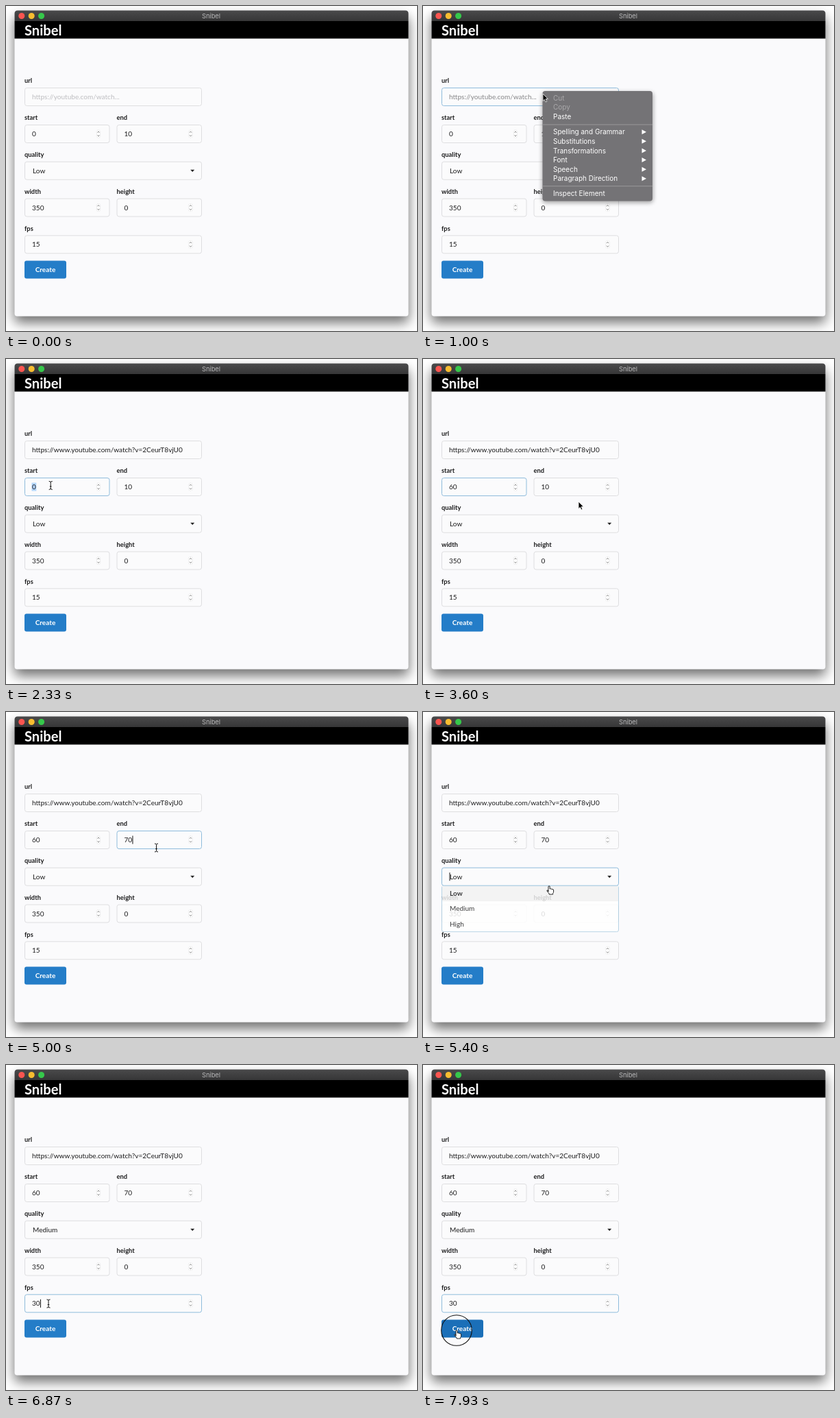
Write an HTML page that moves like this. It is 600 px wide and 474 px high and loops after 8000 ms.

```html
<!DOCTYPE html>
<html lang="en">
<head>
<meta charset="utf-8">
<title>Snibel</title>
<style>
html, body { margin: 0; width: 100%; height: 100%; overflow: hidden; background: #fff; }
svg { display: block; width: 600px; height: 474px; }
text { font: 10.05px Lato, sans-serif; fill: #1c1c1d; white-space: pre; }
.label { font-size: 9.35px; font-weight: 700; }
.menu text { font: 10px Inter, sans-serif; fill: #fff; }
.menu .off { fill: #a9a8aa; }
.box { fill: #fbfbfc; stroke: #dedee0; }
.spin { fill: none; stroke: #6d6d6d; stroke-width: .8; }
.ring { fill: none; stroke: #111; stroke-width: 1.1; }
</style>
</head>
<body>
<svg id="stage" viewBox="0 0 600 474">
  <defs>
    <filter id="blur" x="-10%" y="-10%" width="120%" height="120%"><feGaussianBlur stdDeviation="9"/></filter>
    <filter id="soft" x="-10%" y="-10%" width="120%" height="120%"><feGaussianBlur stdDeviation="3"/></filter>
    <linearGradient id="bar" x2="0" y2="1">
      <stop stop-color="#4a4a4b"/><stop offset="1" stop-color="#363637"/>
    </linearGradient>
  </defs>
  <rect width="600" height="474" fill="#fff"/>
  <rect x="12" y="16" width="576" height="446" rx="6" opacity=".56" filter="url(#blur)"/>
  <path d="M12.5 452.5V11q0-4.5 4.5-4.5H583q4.500 4.500 4.500V452.5Z" fill="none"/>
  <rect x="12.500" y="6.500" width="575" height="446" rx="4" fill="#fafafc"/>
  <path d="M12.500 22V11q0-4.500 4.500-4.500H583q4.500 0 4.500 4.500V22Z" fill="url(#bar)"/>
  <rect x="12.500" y="22" width="575" height="25.500" fill="#000"/>
  <circle cx="22.800" cy="14.500" r="4.500" fill="#fb5550"/>
  <circle cx="37.200" cy="14.500" r="4.500" fill="#f8bd30"/>
  <circle cx="51.600" cy="14.500" r="4.500" fill="#36c84b"/>
  <text x="299.500" y="18" text-anchor="middle" style="font:9.300px Inter,sans-serif;fill:#b9b9ba">Snibel</text>
  <text x="27" y="42.500" style="font-size:20.100px;font-weight:700;fill:#fff">Snibel</text>
  <g id="form"></g>
  <rect id="button" x="27" y="371.500" width="61" height="26" rx="3"/>
  <text x="57.500" y="388" text-anchor="middle" style="font-weight:700;fill:#fff">Create</text>
  <g id="list"></g>
  <g id="menu" class="menu"></g>
  <circle id="ring" class="ring" r="22.300"/>
  <g id="cursor">
    <path id="arrow" d="M0 0V10.500L2.400 8.300 4 12 5.800 11.200 4.200 7.600H7.400Z" fill="#000" stroke="#fff" stroke-width=".8"/>
    <path id="beam" d="M-2.500-6Q0-6 0-4.500V4.500Q0 6-2.500 6M2.500-6Q0-6 0-4.500M0 4.500Q0 6 2.500 6M-1.300 1.500H1.300" fill="none" stroke="#111"/>
    <path id="hand" d="M-1 8V1Q-1-.3.1-.3T1.200 1V4Q2.200 3.200 3.100 4.300 4 3.600 5 4.700 6.600 4.300 6.600 6V8Q6.600 9.500 5.600 10.500V12H.2V11L-3 7Q-3.400 5.600-2.200 5.900L-1 7Z" fill="#fff" stroke="#111" stroke-width=".9"/>
  </g>
</svg>
<script>
const LOOP = 8000, STEP = 1000 / 15;
const $ = id => document.getElementById(id);
const within = (t, ranges) => ranges.some(([a, b]) => t >= a && t < b);
const latest = (t, steps) => steps.filter(s => s[0] <= t).pop();
const clamp = v => Math.max(0, Math.min(1, v));
const show = (el, on) => el.setAttribute('visibility', on ? 'visible' : 'hidden');
const set = (el, attrs) => { for (const k in attrs) el.setAttribute(k, attrs[k]); };

const URL_TEXT = 'https://www.youtube.com/watch?v=2CeurT8vjU0';
const BLUE = '#8fbcdc';
const fields = [
  { name: 'url', x: 27, y: 119, w: 259, steps: [[0, 'https://youtube.com/watch...'], [1600, URL_TEXT]],
    focus: [600, 2130], caret: [[1600, 2100]], home: [[1460, 1600]] },
  { name: 'start', x: 27, y: 173, w: 124.500, spin: 1, steps: [[0, '0'], [3200, '6'], [3330, '60']],
    focus: [2130, 4000], pick: [2200, 3200] },
  { name: 'end', x: 161.500, y: 173, w: 124.500, spin: 1, steps: [[0, '10'], [4470, '7'], [4600, '70']],
    focus: [4000, 5230], pick: [4070, 4470], caret: [[4470, 5200]] },
  { name: 'quality', x: 27, y: 226.700, w: 259, steps: [[0, 'Low'], [5660, 'Medium']],
    focus: [5230, 6400], home: [[5260, 5600], [5800, 6200]] },
  { name: 'width', x: 27, y: 280.500, w: 124.500, spin: 1, steps: [[0, '350']] },
  { name: 'height', x: 161.500, y: 280.500, w: 124.500, spin: 1, steps: [[0, '0']] },
  { name: 'fps', x: 27, y: 334.300, w: 259, spin: 1, steps: [[0, '15'], [6730, '3'], [6860, '30']],
    focus: [6400, LOOP], pick: [6470, 6730], caret: [[6730, 7360]] }
];

// time, x, y, pointer shape until the next key
const path = [
  [270, 284, 222, 'arrow'], [470, 205, 145, 'beam'], [660, 175, 128, 'beam'],
  [930, 175, 128, 'arrow'], [1000, 175, 128, 'arrow'], [1200, 182, 160, 'arrow'],
  [1400, 180, 163, 'arrow'], [1530, 179, 167, 'arrow'], [1600, 168, 171, 'arrow'],
  [1730, 77, 177, 'beam'], [1870, 66, 178, 'beam'], [2070, 66, 178, 'beam'],
  [2400, 65, 186, 'beam'], [3470, 65, 186, 'beam'], [3600, 227, 208, 'arrow'],
  [3800, 223, 200, 'beam'], [4000, 219.500, 198, 'beam'], [5000, 219.500, 198, 'beam'],
  [5130, 200, 230, 'hand'], [5260, 190, 241, 'hand'], [5400, 184, 254, 'hand'],
  [5600, 178, 287, 'hand'], [5870, 178, 287, 'hand'], [6000, 150, 306, 'arrow'],
  [6200, 80, 342, 'beam'], [6400, 62, 348, 'beam'], [7100, 62, 348, 'beam'],
  [7400, 68, 374, 'hand'], [7600, 60, 382, 'hand'], [7800, 49, 387, 'hand']
];
const clicks = [[1230, 1340], [2130, 2270], [4000, 4140], [5230, 5340], [5600, 5730], [6400, 6540], [7860, LOOP]];

$('form').innerHTML = fields.map(f => {
  const cy = f.y + 13.500, right = f.x + f.w;
  const icon = f.spin
    ? `<g transform="translate(${right - 16.500} ${cy})"><rect x="-2.600" y="-5.500" width="5.200" height="11" rx="2" fill="#fff" stroke="#ccc" stroke-width=".6" stroke-dasharray="1 1"/>
       <path class="spin" d="M-1.500-1.800L0-3.600 1.500-1.800M-1.500 1.800L0 3.600 1.500 1.800"/></g>`
    : f.name === 'quality' ? `<path d="M269.200 238.800h6l-3 3.200z" fill="#222"/>` : '';
  return `<text class="label" x="${f.x}" y="${f.y - 6.700}">${f.name}</text>
    <rect class="box" x="${f.x + .5}" y="${f.y + .5}" width="${f.w - 1}" height="26" rx="3"/>
    <rect class="pick" x="${f.x + 10.500}" y="${cy - 6}" height="12" fill="#b3d6fd"/>
    <text class="value" x="${f.x + (f.name === 'quality' ? 12 : 11)}" y="${cy + 3.500}"></text>
    <path class="caret" stroke="#111"/>${icon}`;
}).join('');
for (const part of ['box', 'pick', 'value', 'caret'])
  document.querySelectorAll('#form .' + part).forEach((el, i) => fields[i][part + 'El'] = el);

$('list').innerHTML = `<rect x="27.500" y="253.500" width="258" height="79" rx="3" fill="#fff" stroke="#a5c9df"/>
  <rect id="hover" x="28" width="257" height="26" fill="#f2f2f2"/>` +
  ['Low', 'Medium', 'High'].map((s, i) =>
    `<text x="39" y="${270.500 + i * 26.500}"${i ? '' : ' font-weight="700" style="font-weight:700"'}>${s}</text>`).join('');

const items = [['Cut', 137.500], ['Copy', 151], ['Paste', 164.700], ['Spelling and Grammar', 187.200], ['Substitutions', 200.800],
  ['Transformations', 214.500], ['Font', 228], ['Speech', 241.700], ['Paragraph Direction', 255.300], ['Inspect Element', 277.300]];
$('menu').innerHTML = `<rect x="174" y="126" width="162" height="161" rx="5" opacity=".35" filter="url(#soft)"/>
  <rect x="174.500" y="124" width="160.500" height="160.500" rx="4" fill="#747376"/>
  <rect id="paste" x="174.500" y="154.500" width="160.500" height="13.500" fill="#2a72e8"/>
  <path d="M175 173H335M175 262.700H335" stroke="#99989a"/>` +
  items.map(([s, y], i) => `<text x="190" y="${y}"${i < 2 ? ' class="off"' : ''}>${s}</text>` +
    (i > 2 && i < 9 ? `<path d="M319.500 ${y - 7}l6.500 3.500-6.500 3.500z" fill="#fff"/>` : '')).join('');

function drawField(f, t) {
  const focused = f.focus && within(t, [f.focus]);
  const hint = f.name === 'url' && t < 1600;
  f.valueEl.textContent = latest(t, f.steps)[1];
  f.valueEl.style.fill = hint ? (focused ? '#858587' : '#bdbdc0') : '';
  f.boxEl.style.stroke = !focused ? '' : f.name === 'quality' && t > 5730 ? '#a3a3a5' : BLUE;
  const picked = !!f.pick && within(t, [f.pick]);
  const width = f.valueEl.getComputedTextLength();
  show(f.pickEl, picked);
  f.pickEl.setAttribute('width', width + 1);
  const atHome = within(t, f.home || []);
  const left = +f.valueEl.getAttribute('x') + (atHome ? 0 : width + .8);
  f.caretEl.setAttribute('d', `M${left} ${f.y + 7.500}v12`);
  show(f.caretEl, atHome || within(t, f.caret || []));
}

function drawCursor(t) {
  const i = path.findLastIndex(k => k[0] <= t);
  show($('cursor'), i >= 0);
  show($('ring'), within(t, clicks));
  if (i < 0) {
    for (const id of ['arrow', 'beam', 'hand']) show($(id), false);
    return [0, 0];
  }
  const a = path[i], b = path[i + 1] || a;
  const p = b === a ? 0 : (t - a[0]) / (b[0] - a[0]);
  const x = a[1] + (b[1] - a[1]) * p, y = a[2] + (b[2] - a[2]) * p;
  $('cursor').setAttribute('transform', `translate(${x} ${y})`);
  for (const id of ['arrow', 'beam', 'hand']) show($(id), id === a[3]);
  set($('ring'), { cx: x, cy: y });
  return [x, y];
}

function draw(t) {
  fields.forEach(f => drawField(f, t));
  const y = drawCursor(t)[1];

  const menuOn = within(t, [[930, 1530]]);
  show($('menu'), menuOn);
  $('menu').setAttribute('opacity', 1 - clamp((t - 1340) / 190));
  show($('paste'), menuOn && y > 154 && !within(t, [[1260, 1320]]));

  const open = clamp((t - 5230) / 200) * (1 - clamp((t - 5660) / 140));
  show($('list'), open > 0);
  set($('list'), { opacity: open, transform: `translate(0 ${253 * (1 - open)}) scale(1 ${open || 1})` });
  const row = Math.floor((y - 253.500) / 26.300);
  set($('hover'), { y: 254 + clamp(row / 2) * 52.600 });
  $('button').setAttribute('fill', t >= 7400 ? '#1b6fb8' : '#247dc8');
}

function tick() {
  const t = performance.now() % LOOP;
  draw(Math.floor((t + 4) / STEP) * STEP);
  requestAnimationFrame(tick);
}
tick();
</script>
</body>
</html>
```
